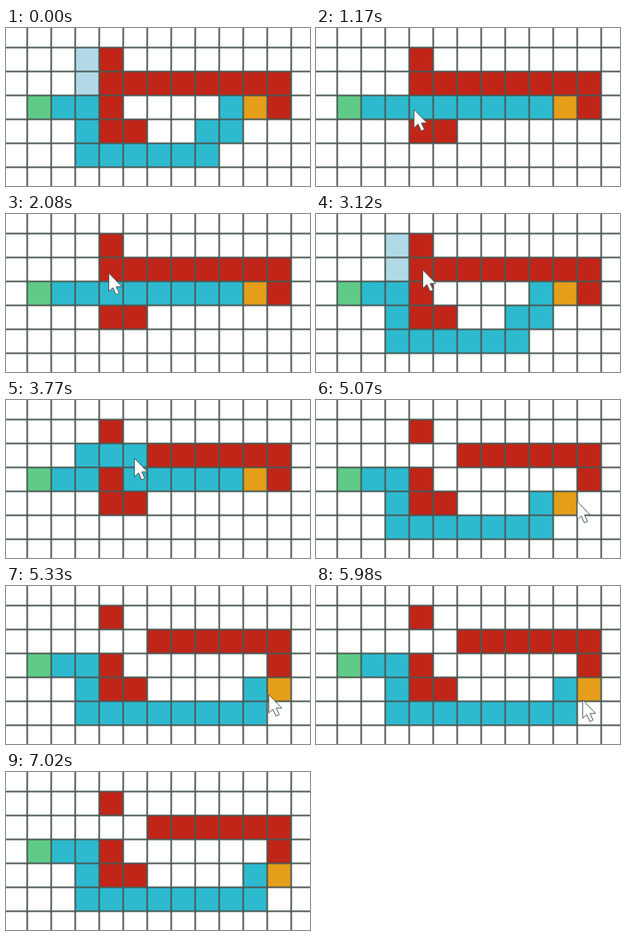
Write an HTML page with a canvas that moves like this. It is 380 by 198 pixels and loops after 7150 ms.

```html
<!DOCTYPE html>
<html lang="en">
<head>
<meta charset="utf-8">
<title>Pathfinding grid</title>
<style>
  html, body { margin: 0; width: 100%; height: 100%; overflow: hidden; background: #fff; }
  canvas { display: block; }
</style>
</head>
<body>
<canvas id="stage" width="380" height="198"></canvas>
<script>
const ctx = document.getElementById('stage').getContext('2d');
const WIDTH = 380, HEIGHT = 198;
const LOOP = 7150, STEP = 130;
const CELL = 30, LEFT = 26.5, TOP = 24.5, COLS = 12, ROWS = 6;
const COLORS = {
  wall: '#c02518', path: '#2dbacf', visited: '#b2d9e7',
  start: '#60cb88', goal: '#e59e19', line: '#4b5954'
};
const START = [0, 2];

// A click toggles the wall under the pointer; a drag carries the goal along.
const CLICKS = [1170, 2600, 3250, 3770];
const DRAG = { from: 4550, to: 5330 };

// Pointer keys: time, x, y of the tip.
const POINTER = [
  [390, 152, 196], [1040, 122, 101], [1690, 122, 101], [2080, 128, 73],
  [2600, 129, 95], [3120, 133, 69], [3770, 160, 72], [DRAG.from, 320, 100],
  [DRAG.to, 328, 135], [5850, 328, 135], [6500, 374, 200]
];
const arrow = new Path2D('M0 0V23L5.2 18.4L9 27L13 25.2L9.2 17H16.2Z');

const same = (a, b) => a[0] === b[0] && a[1] === b[1];
const distance = (a, b) => Math.hypot(a[0] - b[0], a[1] - b[1]);
const allCells = Array.from({ length: COLS * ROWS },
  (_, i) => [i % COLS, Math.floor(i / COLS)]);

function isBuilt([c, r]) {
  const column = c === 3 && r <= 3;
  const beam = r === 1 && c >= 3 && c <= 10;
  return column || beam || (c === 10 && r === 2) || (c === 4 && r === 3);
}

function pointerAt(t) {
  const next = POINTER.findIndex(key => key[0] > t);
  if (next < 1) return null;
  const [t0, x0, y0] = POINTER[next - 1], [t1, x1, y1] = POINTER[next];
  const p = (t - t0) / (t1 - t0), e = p * p * (3 - 2 * p);
  return [x0 + (x1 - x0) * e, y0 + (y1 - y0) * e];
}

function cellUnderPointer(t) {
  const [x, y] = pointerAt(t);
  return [Math.floor((x - LEFT) / CELL), Math.floor((y - TOP) / CELL)];
}

function wallsAt(t) {
  const toggled = CLICKS.filter(click => click <= t).map(cellUnderPointer);
  return allCells.filter(cell =>
    toggled.filter(other => same(cell, other)).length % 2 ? !isBuilt(cell) : isBuilt(cell));
}

function freeNeighbours([c, r], walls) {
  return [[c, r - 1], [c + 1, r], [c, r + 1], [c - 1, r]].filter(cell =>
    allCells.some(other => same(cell, other)) && !walls.some(wall => same(cell, wall)));
}

// Shortest route; among equal steps, take the one nearest the goal.
function findRoute(goal, walls) {
  const steps = new Map([[goal.join(), 0]]);
  const queue = [goal];
  for (const cell of queue) {
    for (const near of freeNeighbours(cell, walls)) {
      if (steps.has(near.join())) continue;
      steps.set(near.join(), steps.get(cell.join()) + 1);
      queue.push(near);
    }
  }
  const route = [START];
  while (!same(route.at(-1), goal)) {
    const cell = route.at(-1);
    const closer = freeNeighbours(cell, walls)
      .filter(near => steps.get(near.join()) < steps.get(cell.join()));
    route.push(closer.reduce((best, near) =>
      distance(near, goal) < distance(best, goal) ? near : best));
  }
  return route;
}

// Cells tried above the turn when up and down look equally good.
function triedCells(route, goal) {
  const turn = route.findIndex(cell => cell[1] > START[1]);
  if (turn < 0 || goal[1] !== START[1]) return [];
  const [c, r] = route[turn - 1];
  return allCells.filter(cell => cell[0] === c && cell[1] < r);
}

function fillCells(cells, color) {
  ctx.fillStyle = color;
  for (const [c, r] of cells) {
    ctx.fillRect(LEFT + c * CELL, TOP + r * CELL, CELL, CELL);
  }
}

function drawLines() {
  ctx.beginPath();
  for (let x = LEFT; x < WIDTH; x += CELL) { ctx.moveTo(x, 0); ctx.lineTo(x, HEIGHT); }
  for (let y = TOP; y < HEIGHT; y += CELL) { ctx.moveTo(0, y); ctx.lineTo(WIDTH, y); }
  ctx.strokeStyle = COLORS.line;
  ctx.lineWidth = 2;
  ctx.stroke();
}

function drawPointer([x, y]) {
  ctx.save();
  ctx.translate(x + 0.5, y + 1);
  ctx.fillStyle = '#fff';
  ctx.strokeStyle = '#4f5a57';
  ctx.lineWidth = 1;
  ctx.lineJoin = 'round';
  ctx.fill(arrow);
  ctx.stroke(arrow);
  ctx.restore();
}

function draw(t) {
  const goal = cellUnderPointer(Math.min(Math.max(t, DRAG.from), DRAG.to));
  const walls = wallsAt(t);
  const route = findRoute(goal, walls);
  ctx.fillStyle = '#fff';
  ctx.fillRect(0, 0, WIDTH, HEIGHT);
  fillCells(triedCells(route, goal), COLORS.visited);
  fillCells(walls, COLORS.wall);
  fillCells(route, COLORS.path);
  fillCells([START], COLORS.start);
  fillCells([goal], COLORS.goal);
  drawLines();
  const pointer = pointerAt(t);
  if (pointer) drawPointer(pointer);
}

function tick() {
  draw(Math.floor(performance.now() % LOOP / STEP) * STEP);
  requestAnimationFrame(tick);
}
tick();
</script>
</body>
</html>
```
